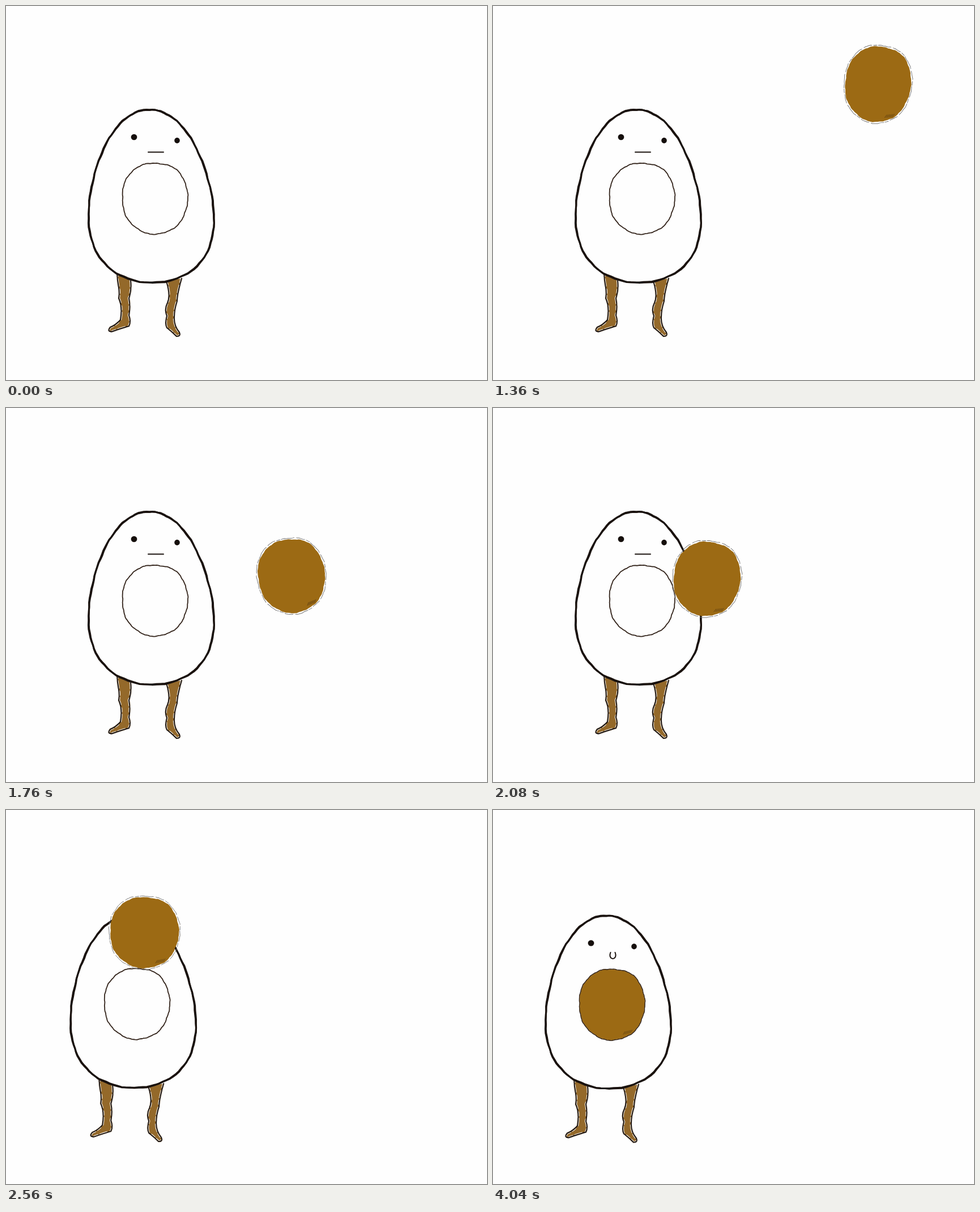
An HTML page for the animation above (5800 ms loop, 849 by 659 pixels).

```html
<!DOCTYPE html>
<html lang="en">
<head>
<meta charset="utf-8">
<title>Egg and yolk</title>
<style>
  html, body { margin: 0; width: 100%; height: 100%; overflow: hidden; background: #fefefe; }
  svg { display: block; width: 100vw; height: 100vh; }
  path, use { stroke-linejoin: round; stroke-linecap: round; }
  .line { fill: none; stroke: #1a120e; stroke-width: 2; }
  .gap { fill: #94692a; stroke: #f0e9de; stroke-width: 4.2; stroke-dasharray: 6 5 12 7; }
  #shell { fill: #fefefe; stroke: #1a120e; stroke-width: 3.2; }
  #shade { fill: none; stroke: #1a120e; stroke-width: 2.8; }
  #ring { fill: none; stroke: #33241b; stroke-width: 1.8; }
  #halo { fill: none; stroke: #777; stroke-width: .9; stroke-dasharray: 14 3 6 2 22 4; }
  #fill { fill: #9c6a14; }
</style>
</head>
<body>
<svg viewBox="0 0 849 659">
  <defs>
    <path id="legs" d="M196 470C197 500 202 495 199 515Q206 530 202 553Q194 562 184 566Q178 573 186 574
      Q200 569 217 564Q221 556 217 545Q220 530 217 515Q222 500 220 484
      M283 485Q291 510 285 523Q279 535 284 546Q280 560 284 567Q292 573 301 582
      Q309 582 306 575Q296 563 297 548Q297 535 302 520Q302 508 310 480"/>
  </defs>
  <g id="egg">
    <use href="#legs" class="gap"/>
    <use href="#legs" class="line"/>
    <path id="shell"/>
    <path id="shade"/>
    <path id="ring"/>
    <ellipse cx="226" cy="231" rx="5.4" ry="5.2" fill="#150e0b"/>
    <ellipse cx="302" cy="237" rx="4.8" ry="5" fill="#150e0b"/>
    <path id="mouth" class="line"/>
  </g>
  <g id="ball">
    <path id="fill"/>
    <path id="halo" transform="scale(1.035)"/>
    <path id="hatch" class="line" style="stroke-width: .8; stroke-opacity: .5"/>
  </g>
</svg>
<script>
const $ = id => document.getElementById(id);
const LOOP = 5800, STEP = 80;
const FIRST_HIT = 7, SECOND_HIT = 15, REST = 21;
const clamp = (v, lo, hi) => Math.max(lo, Math.min(hi, v));
const mix = (a, b, k) => a + (b - a) * k;
const setPath = (id, d) => $(id).setAttribute('d', d);

// Closed, slightly shaky pen line around a shape given by angle
function penLine(shape, shake, seed) {
  const pts = [];
  for (let i = 0; i < 120; i++) {
    const a = i * Math.PI / 60;
    const r = shake * (Math.sin(7 * a + seed) + .7 * Math.sin(18 * a + 2 * seed) + .5 * Math.sin(41 * a));
    const [x, y] = shape(a);
    pts.push([x + r * Math.cos(a), y + r * Math.sin(a)].map(v => v.toFixed(2)));
  }
  return 'M' + pts.join('L') + 'Z';
}

function eggShape(a) {
  const s = Math.sin(a);
  return [255.8 + 2.5 * s + (107.5 + 24 * s + 12 * s * s) * Math.cos(a), 335 + 152.5 * s];
}

// Ellipse with a fuller upper half
function yolkShape(a) {
  const bulge = 1 + (Math.sin(a) < 0 ? .045 : .01) * Math.sin(2 * a) ** 2;
  return [57.7 * bulge * Math.cos(a), 62.5 * bulge * Math.sin(a)];
}

setPath('shell', penLine(eggShape, .5, 1));
setPath('shade', penLine(eggShape, .6, 4));
setPath('ring', penLine(a => yolkShape(a).map((v, i) => v + [263, 339.5][i]), .5, 2));
setPath('fill', penLine(yolkShape, .5, 2));
setPath('halo', penLine(yolkShape, .5, 3));

let hatch = '';
for (let i = 0; i < 6; i++) hatch += `M${20 + 2.6 * i} ${53 - .6 * i}l3-5`;
setPath('hatch', hatch);

// Position and vertical speed of the ball after n steps: drop, bounce, hop into the egg
function flight(n) {
  if (n <= FIRST_HIT) return [797 - 29.4 * n, -54 + 12 * n * n, 24 * n];
  if (n <= SECOND_HIT) {
    const u = (n - FIRST_HIT) / (SECOND_HIT - FIRST_HIT);
    const w = 2 * u - 1, h = u < .5 ? 301 : 321;
    return [588 - 253 * (u + .437 * u * (1 - u)), 221 + h * w * w, h * w / 2];
  }
  const m = n - SECOND_HIT - 1;
  return [296 - 17.2 * m, 413 - 143 * m + 25.8 * m * m, -143 + 51.6 * m];
}

function placeBall(n) {
  const [x, y, v] = flight(n);
  const resting = n === REST;
  const stretch = Math.min(.16, .14 * (v / 140) ** 2);
  let sx = 1.05 - .7 * stretch, sy = 1 + stretch, tilt = clamp(v / 8, -8, 8);
  if (n === FIRST_HIT || n === SECOND_HIT) [sx, sy, tilt] = [1.5, .7, 0];
  if (resting) [sx, sy, tilt] = [.99, .99, 0];
  $('ball').setAttribute('transform', `translate(${x} ${y}) rotate(${tilt}) scale(${sx} ${sy})`);
  $('halo').style.display = resting ? 'none' : '';
}

// Straight line at k = 0, small U at k = 1
function placeMouth(k) {
  const half = mix(13.5, 4, k), swell = mix(5, 9.5, k);
  const top = mix(257.5, 247.5, k), low = mix(257.5, 262, k), cx = 264.5;
  setPath('mouth', `M${cx - half} ${top}C${cx - swell} ${low} ${cx + swell} ${low} ${cx + half} ${top}`);
}

function frame(t) {
  const n = Math.floor((t - 1040) / STEP);
  $('ball').style.display = n < 0 ? 'none' : '';
  if (n >= 0) placeBall(Math.min(n, REST));
  const slide = clamp((n - SECOND_HIT - 1) / 5, 0, 1);
  $('egg').setAttribute('transform', `translate(${-53 * slide} ${3.5 * slide})`);
  placeMouth(clamp((Math.floor((t - 3800) / STEP) + 1) / 4, 0, 1));
}

const start = performance.now();
function tick() {
  frame((performance.now() - start) % LOOP);
  requestAnimationFrame(tick);
}
tick();
</script>
</body>
</html>
```
